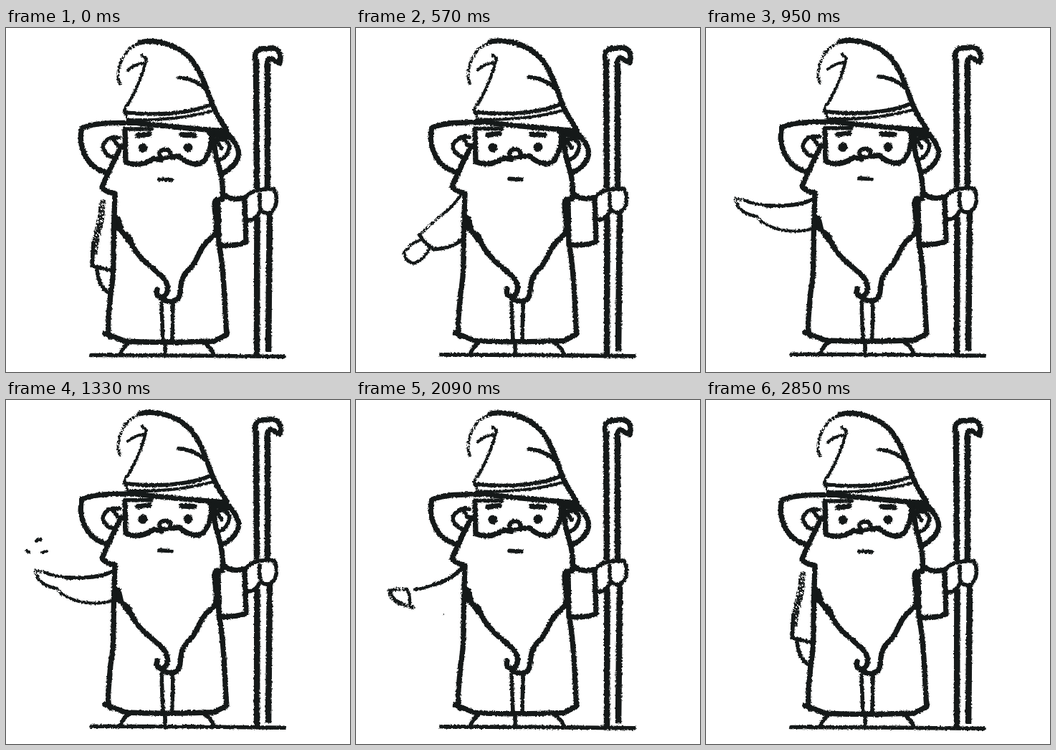
An HTML page that plays this animation: 480x480 px, repeating every 3.61 s.

```html
<!DOCTYPE html>
<html lang="en">
<head>
<meta charset="utf-8">
<title>Wizard</title>
<style>
  html, body { margin: 0; height: 100%; overflow: hidden; background: #fff; }
  svg { display: block; width: 100vw; height: 100vh; }
  #ink { fill: none; stroke: #151919; stroke-width: 7.4; stroke-linecap: round; stroke-linejoin: round; }
  .mid { stroke-width: 5.6; }
  .thin { stroke-width: 4.2; }
  .staff { stroke-width: 8.6; stroke-linecap: butt; }
  .solid { fill: #151919; stroke: none; }
  .dry { filter: url(#dry); }
  .pose, .spark { display: none; }
  .on { display: inline; }
</style>
</head>
<body>
<svg viewBox="0 0 480 480">
  <defs>
    <filter id="rough" filterUnits="userSpaceOnUse" x="0" y="0" width="480" height="480" color-interpolation-filters="sRGB">
      <feTurbulence id="noise" type="fractalNoise" baseFrequency=".38" numOctaves="2" seed="1"/>
      <feDisplacementMap in="SourceGraphic" scale="3.6" xChannelSelector="R" yChannelSelector="G"/>
    </filter>
    <filter id="dry" filterUnits="userSpaceOnUse" x="0" y="0" width="480" height="480" color-interpolation-filters="sRGB">
      <feTurbulence type="fractalNoise" baseFrequency=".4" numOctaves="2" seed="8"/>
      <feColorMatrix values="0 0 0 0 0  0 0 0 0 0  0 0 0 0 0  14 0 0 0 -5.4"/>
      <feComposite in="SourceGraphic" operator="in"/>
    </filter>
  </defs>
  <g filter="url(#rough)">
    <g id="ink">
      <!-- hat -->
      <path d="M187 20C209 15 239 23 257 42C273 60 280 86 288 107L294 120L308 143"/>
      <path class="thin dry" d="M159 78C152 64 160 43 171 30L187 20"/>
      <path class="thin" d="M170 59Q178 51 192 49M190 38L196 43C191 66 182 86 170 107"/>
      <path class="thin dry" d="M168 108L165 115L170 128"/>
      <path class="mid" d="M241 69Q264 71 278 85M166 118C205 122 255 121 287 106"/>
      <path class="thin" d="M170 128C215 130 260 124 290 115"/>
      <path d="M106 140C100 160 110 182 121 192Q130 199 141 202"/>
      <path d="M106 140C125 131 150 133 180 132C215 137 260 140 305 144C318 155 327 169 324 180Q318 196 301 203"/>
      <path class="solid" d="M242 136L308 141L320 158L302 154L285 152L278 144Z"/>
      <!-- face -->
      <path class="mid" d="M166 141H203M158 153C146 150 136 157 135 167Q140 180 150 180M149 154L156 164"/>
      <path d="M166 143L167 187C180 193 194 190 206 182L217 184M231 180L242 179C256 192 272 193 278 183Q287 170 287 148"/>
      <path class="mid" d="M296 156Q308 153 312 165Q309 181 298 184M293 156L301 168"/>
      <ellipse class="mid" cx="222" cy="175.500" rx="8" ry="6"/>
      <path class="mid" d="M216 172Q222 167 229 173"/>
      <path d="M184 150L200 148M245 149L263 150"/>
      <circle class="solid" cx="191" cy="167.500" r="6.500"/>
      <circle class="solid" cx="254" cy="167" r="6.500"/>
      <path class="mid" d="M214 211L231 212"/>
      <!-- beard -->
      <path d="M161 165C152 181 141 206 134 222Q138 229 152 231L151 263L157 267L161 284L171 291L176 303Q186 321 201 332L216 345C229 357 228 373 217 376Q208 374 211 365"/>
      <path d="M215 375C226 386 241 384 243 369C244 352 247 344 258 334C268 324 270 305 285 294L292 287C297 270 287 247 293 240L302 239C304 215 299 200 293 180L289 153"/>
      <path d="M153 266L157 280M165 288L171 297M293 245L295 287"/>
      <!-- robe -->
      <path d="M151 265C149 310 152 340 146 370C144 398 140 420 145 431M138 426L166 437C205 440 250 438 290 437L308 428C305 400 306 350 298 306"/>
      <path class="mid" d="M217 384L219 437M233 383L232 437M222 440V457M171 440Q164 444 159 456M277 440Q286 445 290 456"/>
      <path class="mid" d="M119 456.500L250 457L388 458.500"/>
      <!-- sleeve, hand, staff -->
      <path d="M303 231Q312 242 333 237L335 299Q318 305 297 303L296 245"/>
      <path class="mid" d="M335 236C342 226 358 224 374 225C380 237 378 250 370 257Q357 262 354 248V232M336 268Q349 269 354 256"/>
      <path class="staff" d="M349 44L350 224M365 50V223M350.500 264L350 457M368 259L366 452"/>
      <path d="M348 45C345 31 355 28 363 29C378 25 386 33 382 49L374 45Q365 37 364 54"/>
      <!-- arm poses -->
      <g class="pose">
        <path class="solid dry" d="M131 240L139 239L137 268L131 292L127 316L118 318L121 292L127 268Z"/>
        <path class="dry" d="M131 264L126 290L123 305"/>
        <path class="mid" d="M122 300L120 332L146 338M127 338Q130 362 143 369"/>
      </g>
      <g class="pose">
        <path class="solid dry" d="M133 240L128 258L112 292L98 324L92 322L106 290L122 262Z"/>
        <path class="mid" d="M94 322Q106 332 124 337Q139 329 148 311"/>
        <path class="thin" d="M97 331L89 341M85 354Q87 363 102 361Q115 350 117 340"/>
        <path class="thin dry" d="M89 341L85 354"/>
      </g>
      <g class="pose">
        <path class="thin" d="M146 234Q138 247 124 258"/>
        <path class="thin dry" d="M124 258Q106 272 90 288"/>
        <path class="mid" d="M89 290Q96 301 108 309Q130 310 148 296"/>
        <path class="thin" d="M88 297L78 302M67 313Q69 328 81 329Q97 322 102 309"/>
        <path class="thin dry" d="M78 302L67 313"/>
      </g>
      <g class="pose">
        <path class="mid" d="M148 235C138 247 119 256 106 259"/>
        <path class="thin" d="M106 259Q95 264 82 265"/>
        <path class="mid dry" d="M71 265Q57 263 47 267Q47 277 60 284L80 290"/>
        <path class="thin" d="M71 265Q76 272 75 286M48 268Q51 280 64 284"/>
        <circle class="solid" cx="122" cy="300" r=".8"/>
      </g>
      <g class="pose">
        <path class="mid" d="M148 241C128 250 104 250 85 249"/>
        <path class="thin" d="M85 249Q66 247 54 242M77 271C95 284 124 289 149 281"/>
        <path class="thin dry" d="M54 242L40 239L45 251Q54 263 71 264L77 271"/>
        <path class="thin" d="M46 252Q56 262 71 264"/>
        <path class="spark thin" d="M48 210L46 215M42 218L43 220M49 223L46 225"/>
        <path class="spark thin" d="M42 198L45 196M48 195V197M29 212L32 213M51 214L57 212"/>
        <path class="spark thin" d="M45 199L48 200M34 207L37 208M52 208L56 207"/>
        <path class="spark thin" d="M46 201L48 202M40 207L42 208M54 208L56 207"/>
      </g>
    </g>
  </g>
</svg>
<script>
  const LOOP = 3610;
  const starts = [0, 380, 570, 760, 950, 1140, 1330, 1520, 1710, 1900, 2090, 2280, 2470, 2850];
  const poseAt = [0, 1, 2, 3, 4, 4, 4, 4, 4, 4, 3, 2, 1, 0];
  const poses = document.querySelectorAll('.pose');
  const sparks = document.querySelectorAll('.spark');
  const ink = document.getElementById('ink');
  const noise = document.getElementById('noise');
  const showOnly = (items, index) => items.forEach((el, i) => el.classList.toggle('on', i === index));
  let shown = -1;

  function draw() {
    const time = performance.now() % LOOP;
    const step = starts.findLastIndex(start => start <= time);
    if (step !== shown) {
      shown = step;
      const pose = poseAt[step];
      // The rest, swing and casting drawings each have their own line grain.
      const sheet = pose === 0 ? 0 : pose === 4 ? 2 : 1;
      showOnly(poses, pose);
      showOnly(sparks, step - 5);
      noise.setAttribute('seed', sheet + 1);
      ink.setAttribute('transform', `translate(0 ${[0, -0.6, -1.2][sheet]})`);
    }
    requestAnimationFrame(draw);
  }
  draw();
</script>
</body>
</html>
```
